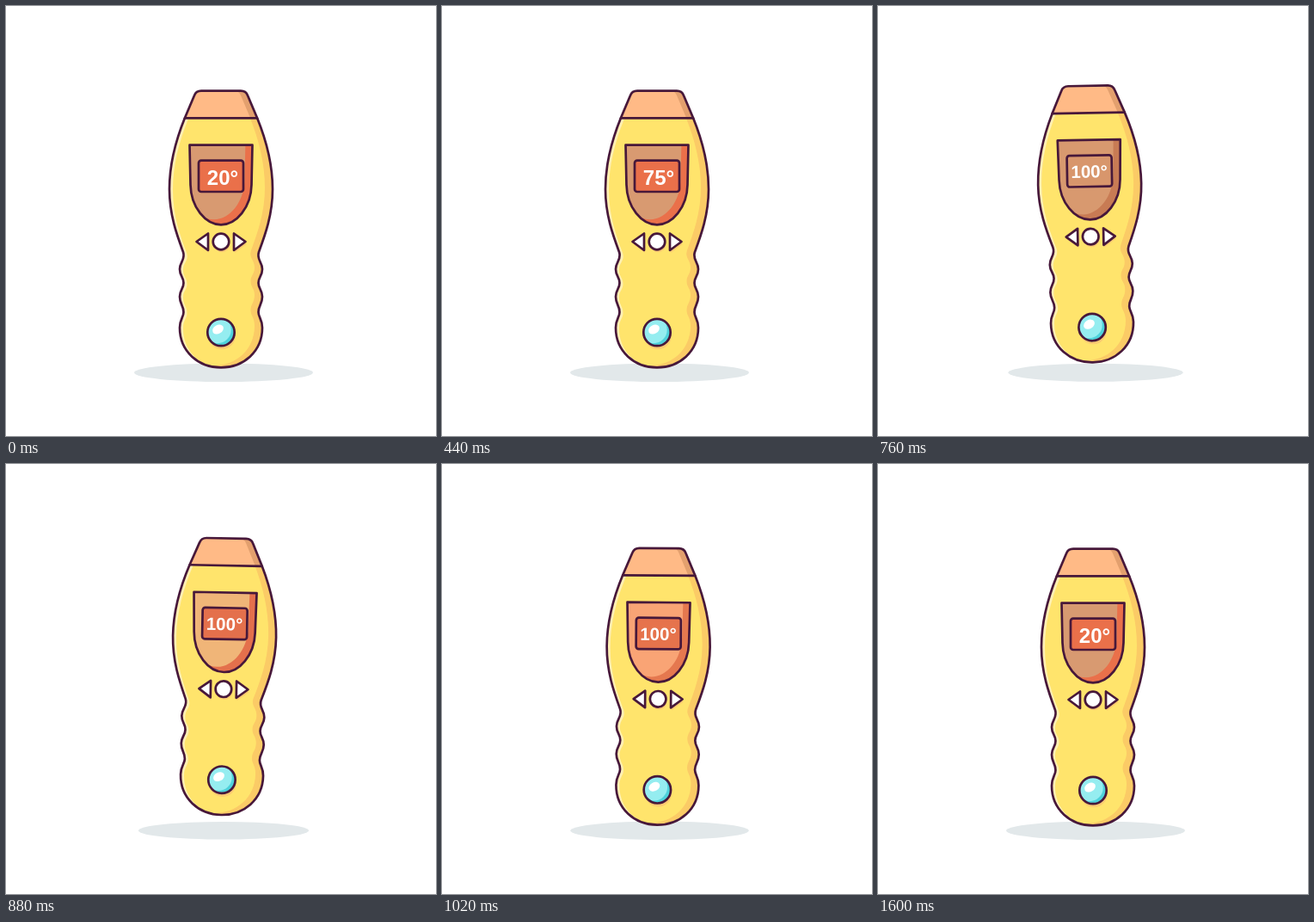
Recreate the animation shown at these times as an HTML page. Size 500 px wide and 500 px high, loop 1.82 s.

```html
<!DOCTYPE html>
<html lang="en">
<head>
<meta charset="utf-8">
<title>Thermometer</title>
<style>
  html, body { margin: 0; width: 100%; height: 100%; overflow: hidden; background: #fff; }
  svg { display: block; width: 100%; height: 100%; }
  .line { stroke: #47183a; stroke-width: 2.7; stroke-linejoin: round; stroke-linecap: round; }
  text { font-family: "Liberation Sans", Arial, sans-serif; font-weight: bold; fill: #fff; text-anchor: middle; }
</style>
</head>
<body>
<svg viewBox="0 0 500 500">
  <defs>
    <path id="body"/>
    <path id="panel"/>
    <path id="aroundBody" fill-rule="evenodd"/>
    <path id="aroundPanel" fill-rule="evenodd"/>
    <g id="keys">
      <path d="M221.5 274L235 264.5V284Z"/>
      <path d="M278.5 274L265 264.5V284Z"/>
      <circle cx="250" cy="274" r="9.3"/>
    </g>
    <circle id="knob" cx="250" cy="379.5" r="15.7"/>
    <clipPath id="inBody"><use href="#body"/></clipPath>
    <clipPath id="inPanel"><use href="#panel"/></clipPath>
    <clipPath id="inKnob"><use href="#knob"/></clipPath>
    <clipPath id="inCap"><path d="M180 80H320V130H180Z"/></clipPath>
  </defs>

  <ellipse id="shadow" cx="253" cy="426.3" rx="104" ry="10.8" fill="#e2e8ea"/>

  <g id="device">
    <g clip-path="url(#inBody)">
      <use href="#body" fill="#ffe46c"/>
      <use href="#aroundBody" x="4" y="1" fill="#fff0b4"/>
      <use href="#aroundBody" x="-9" y="-2" fill="#fbcb66"/>
      <g clip-path="url(#inCap)">
        <use href="#body" fill="#ffba86"/>
        <use href="#aroundBody" x="-8" fill="#e3a06e"/>
      </g>
    </g>
    <path class="line" d="M208 130.3H292"/>
    <use href="#body" class="line" fill="none"/>

    <g clip-path="url(#inPanel)">
      <use id="panelFill" href="#panel"/>
      <use id="panelShade" href="#aroundPanel" x="-8" y="-6"/>
    </g>
    <use href="#panel" class="line" fill="none"/>
    <rect id="display" class="line" x="224" y="179.6" width="52" height="36.4" rx="3"/>
    <text id="reading"></text>

    <g fill="#fbcb72">
      <use href="#keys" x="1" y="3"/>
      <use href="#knob" x="1" y="4"/>
    </g>
    <use href="#keys" class="line" fill="#fff"/>

    <g clip-path="url(#inKnob)">
      <use href="#knob" fill="#4ed2db"/>
      <use href="#knob" x="-4" y="-3" fill="#95edf0"/>
      <ellipse cx="246.5" cy="376" rx="6.8" ry="5" fill="#fff" transform="rotate(-30 246.5 376)"/>
    </g>
    <use href="#knob" class="line" fill="none"/>
  </g>
</svg>
<script>
const $ = id => document.getElementById(id);
const LOOP = 1820;

const bodyPath = `M208 130 L219 104 Q221 98.7 227 98.7 H273 Q279 98.7 281 104 L292 130
  C303 157 310 185 310 213 C310 243 301 267 294 286
  C291 295 298 297 298 306 C298 314 293.5 315 293.5 322
  C293.5 329 298 330 298 338 C298 347 293.5 348 293.5 356
  C293.5 362 298 364 298 374 C298 402 276 420.3 250 420.3
  C224 420.3 202 402 202 374 C202 364 206.5 362 206.5 356
  C206.5 348 202 347 202 338 C202 330 206.5 329 206.5 322
  C206.5 315 202 314 202 306 C202 297 209 295 206 286
  C199 267 190 243 190 213 C190 185 197 157 208 130Z`;
const panelPath = `M213.5 161.7 H286.5 L285.5 208 C285 234 268 254.3 250 254.3
  C232 254.3 215 234 214.5 208Z`;
const surround = "M0 0H500V500H0Z ";

$("body").setAttribute("d", bodyPath);
$("panel").setAttribute("d", panelPath);
$("aroundBody").setAttribute("d", surround + bodyPath);
$("aroundPanel").setAttribute("d", surround + panelPath);

// Hard changes: [start ms, value]
const readings = [[0, 20], [160, 35], [300, 50], [440, 75], [600, 100], [1600, 20]];
const brown = ["#d89a71", "#ea704a", "#ea704a"];
const tints = [ // panel, panel shade, display
  [0, brown],
  [600, ["#d8996f", "#c87b54", "#d8966c"]],
  [820, ["#f0b578", "#e4704c", "#e4704c"]],
  [950, ["#f9a475", "#e5784f", "#e6734c"]],
  [1120, ["#f3b277", "#ec704b", "#ec704b"]],
  [1600, brown]
];
const tilts = [[600, 0], [750, -1.05], [890, 1.1], [1120, 0]]; // degrees

const valueAt = (steps, t) => steps.findLast(([start]) => t >= start)[1];

function easedAt(keys, t) {
  const next = keys.findIndex(([time]) => time > t);
  if (next < 1) return 0;
  const [t0, a] = keys[next - 1], [t1, b] = keys[next];
  return a + (b - a) * (1 - Math.cos(Math.PI * (t - t0) / (t1 - t0))) / 2;
}

// One smooth hop between 670 and 1050 ms
const heightAt = t => Math.abs(t - 860) < 190 ? 12.7 * Math.cos(Math.PI * (t - 860) / 380) ** 2 : 0;

function draw(t) {
  const height = heightAt(t);
  $("device").setAttribute("transform", `translate(0 ${-height}) rotate(${easedAt(tilts, t)} 250 430)`);
  $("shadow").setAttribute("rx", 104 - height * 0.41);
  $("shadow").setAttribute("ry", 10.8 - height * 0.04);

  const [panel, shade, display] = valueAt(tints, t);
  $("panelFill").setAttribute("fill", panel);
  $("panelShade").setAttribute("fill", shade);
  $("display").setAttribute("fill", display);

  const degrees = valueAt(readings, t), wide = degrees > 99;
  const text = $("reading");
  text.textContent = degrees + "°";
  text.setAttribute("x", wide ? 249.7 : 252);
  text.setAttribute("y", wide ? 205.5 : 208);
  text.setAttribute("font-size", wide ? 20.5 : 24);
}

const begin = performance.now();
function tick() {
  draw((performance.now() - begin) % LOOP);
  requestAnimationFrame(tick);
}
tick();
</script>
</body>
</html>
```
